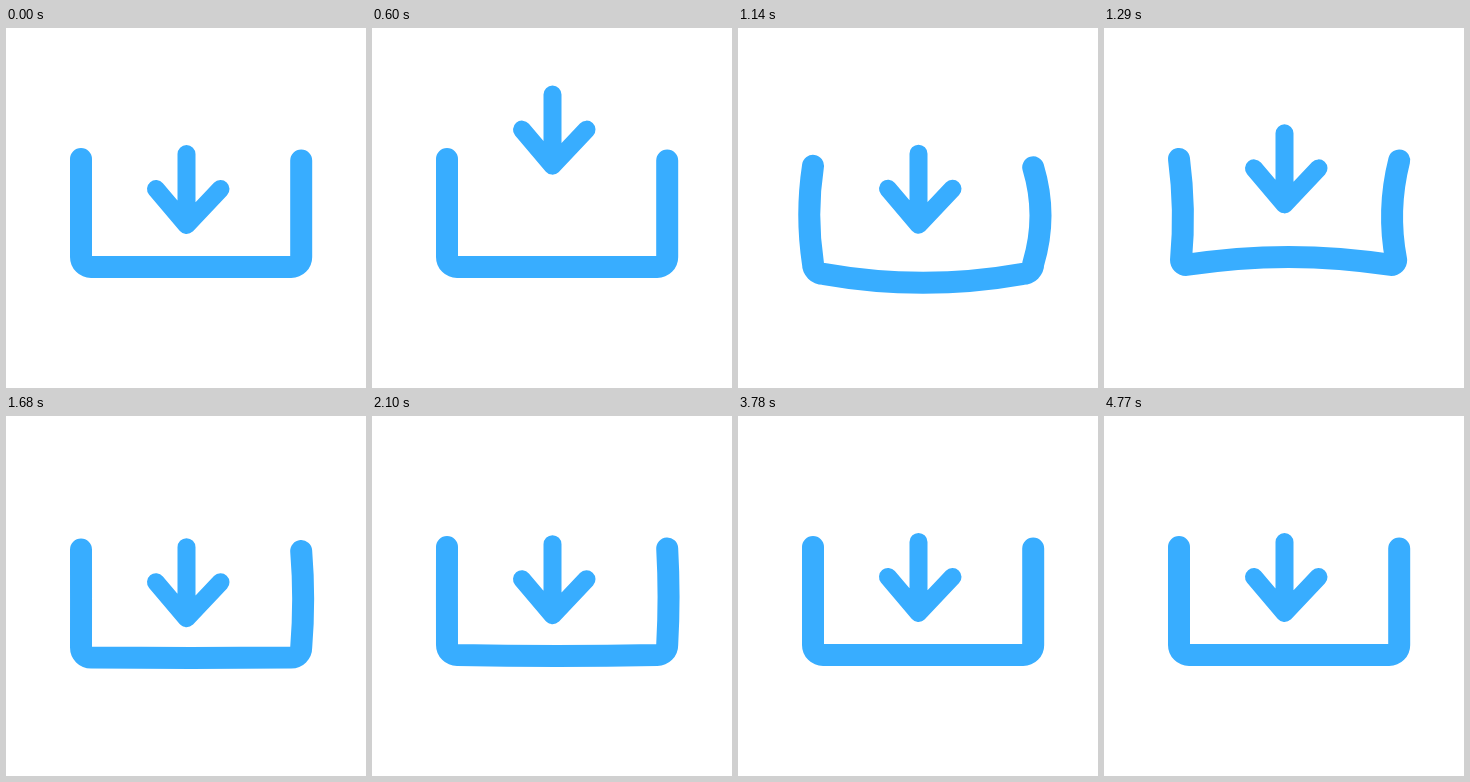
An HTML page for the animation above (4.8 s loop, 360 px wide and 360 px high).

```html
<!DOCTYPE html>
<html lang="en">
<head>
<meta charset="utf-8">
<title>Download</title>
<style>
  html, body { margin: 0; height: 100%; overflow: hidden; background: #fff; }
  svg { display: block; width: 100%; height: 100%; }
  path { fill: none; stroke: #38adff; stroke-linecap: round; stroke-linejoin: round; }
</style>
</head>
<body>
<svg viewBox="0 0 360 360">
  <path id="tray" stroke-width="22"/>
  <path id="arrow" stroke-width="18" d="M180.5 126V197M150 161L180.5 197L214.5 161"/>
</svg>
<script>
const LOOP = 4800;
const LIFT = 300, TOP = 760, LOW = 990;   // arrow leaves, peaks, reaches its lowest point
const HIT = 915, BEND = 955;              // tray is pushed, then starts to flex
const HEIGHT = 81, DEPTH = 39;
const tray = document.getElementById("tray");
const arrow = document.getElementById("arrow");

// Sine ease from a to b between the times t0 and t1.
function ease(t, t0, t1, a, b) {
  const p = Math.min(1, Math.max(0, (t - t0) / (t1 - t0)));
  return a + (b - a) * (1 - Math.cos(Math.PI * p)) / 2;
}

// Damped swing: each half period shrinks the amplitude by the factor keep.
function swing(t, start, half, size, keep, wave = Math.sin) {
  const n = (t - start) / half;
  return n < 0 ? 0 : size * keep ** n * wave(Math.PI * n);
}

function arrowY(t) {
  if (t < TOP) return ease(t, LIFT, TOP, 0, -HEIGHT);
  if (t < LOW) return ease(t, TOP, LOW, -HEIGHT, DEPTH);
  return swing(t, LOW, 300, DEPTH, 0.53, Math.cos);
}

// The tray is pushed down but never lifted.
function trayY(t) {
  return Math.max(0, swing(t, HIT, 300, 17, 0.48));
}

function trayPath(t) {
  const left = swing(t, BEND, 240, 13, 0.35);
  const right = swing(t, BEND, 260, 13.5, 0.6);
  const floor = swing(t, BEND, 245, 21, 0.53);
  const squeeze = Math.max(0, -floor / 8);
  const r = 10 - 5 * squeeze;
  const x0 = 75 + 2 * squeeze, x1 = 295.2 - 3 * squeeze, y = 239 - 2 * squeeze;
  return `M75 131Q${(75 + x0) / 2 - 2 * left} ${(131 + y - r) / 2} ${x0} ${y - r}` +
    `A${r} ${r} 0 0 0 ${x0 + r} ${y}` +
    `Q${(x0 + x1) / 2} ${y + 2 * floor} ${x1 - r} ${y}` +
    `A${r} ${r} 0 0 0 ${x1} ${y - r}` +
    `Q${(295.2 + x1) / 2 + 2 * right} ${(132.5 + y - r) / 2} 295.2 132.5`;
}

function draw() {
  const t = performance.now() % LOOP;
  tray.setAttribute("d", trayPath(t));
  tray.setAttribute("transform", `translate(0 ${trayY(t)})`);
  arrow.setAttribute("transform", `translate(0 ${arrowY(t)})`);
  requestAnimationFrame(draw);
}
draw();
</script>
</body>
</html>
```
